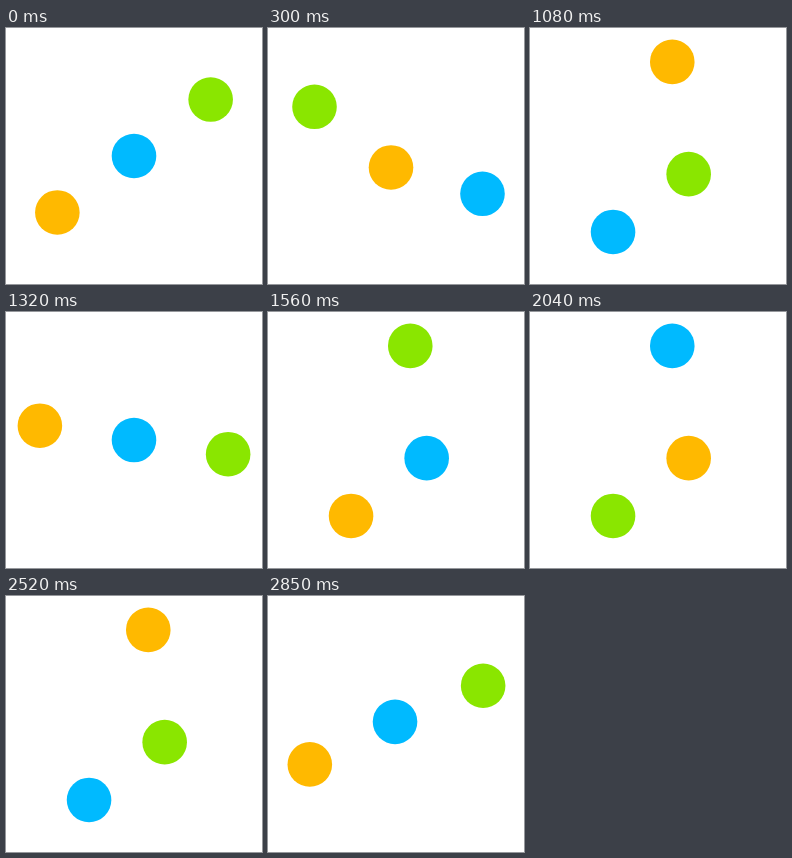
Write an HTML page that moves like this. It is 256 px wide and 256 px high and loops after 2.88 s.

```html
<!DOCTYPE html>
<html lang="en">
<head>
<meta charset="utf-8">
<title>Three dots</title>
<style>
html, body { margin: 0; height: 100%; overflow: hidden; background: #fff; }
svg { display: block; width: 100vw; height: 100vh; }
</style>
</head>
<body>
<svg viewBox="0 0 256 256">
  <circle r="22.3" fill="#8ae600"/>
  <circle r="22.3" fill="#00baff"/>
  <circle r="22.3" fill="#ffb900"/>
</svg>
<script>
const dots = document.querySelectorAll("circle");
const LOOP = 2880, STEP = 480, ORBIT = 95.2, TILT = Math.PI / 5;

const polar = (r, a) => [r * Math.cos(a), -r * Math.sin(a)];

const bezier = (a, b, t) => 3 * (1 - t) ** 2 * t * a + 3 * (1 - t) * t * t * b + t ** 3;

// Ease in, then overshoot slightly before settling
function swapEase(x) {
  let lo = 0, hi = 1;
  for (let i = 0; i < 20; i++) {
    const mid = (lo + hi) / 2;
    if (bezier(0.35, 0.4, mid) < x) lo = mid; else hi = mid;
  }
  return bezier(0, 1.2, lo);
}

function place(i, x, y) {
  const dot = dots[i % 3];
  dot.setAttribute("cx", 128 + x);
  dot.setAttribute("cy", 128 + y);
}

// One dot runs half a circle while the other two swap opposite it
function draw() {
  const time = performance.now() % LOOP;
  const step = Math.floor(time / STEP);
  const part = time / STEP - step;
  const angle = TILT + Math.PI * part;
  const [rx, ry] = polar(ORBIT, angle);
  const [dx, dy] = polar(ORBIT / 2, angle - Math.PI * swapEase(part));
  place(step, rx, ry);
  place(step + 1, -rx / 2 + dx, -ry / 2 + dy);
  place(step + 2, -rx / 2 - dx, -ry / 2 - dy);
  requestAnimationFrame(draw);
}
draw();
</script>
</body>
</html>
```
